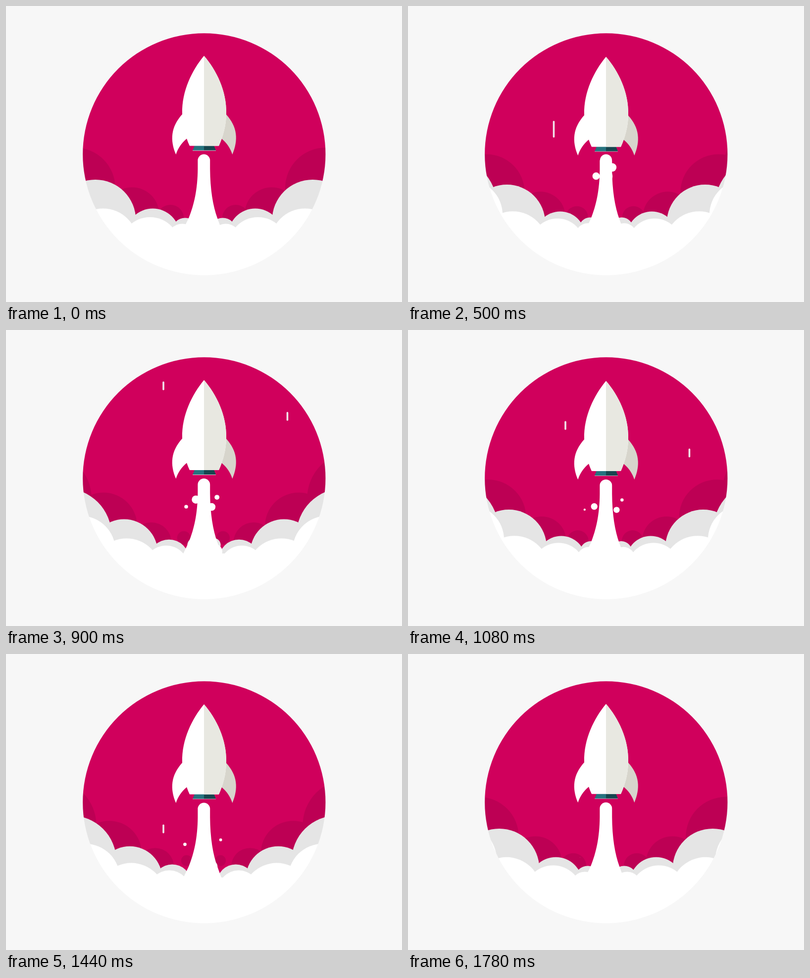
Write an HTML page with a canvas that moves like this. It is 800x600 px and loops after 1.8 s.

```html
<!DOCTYPE html>
<html lang="en">
<head>
<meta charset="utf-8">
<title>Rocket</title>
<style>
html, body { margin: 0; width: 100%; height: 100%; overflow: hidden; background: #f7f7f7; }
canvas { display: block; width: 800px; height: 600px; }
</style>
</head>
<body>
<canvas id="stage" width="800" height="600"></canvas>
<script>
const ctx = document.getElementById('stage').getContext('2d');
const LOOP = 1800, CYCLE = 600, STEP = 20, MID = 400;
const PAPER = '#f7f7f7', PINK = '#d0005c', WHITE = '#fff';

// A cloud is born at the plume and drifts outwards, one stop per cycle.
// away: distance from the middle, top: its highest point, size: radius at stop k
const swell = k => 27.3 * k;
const layers = [
  { color: '#bd0054', away: [13, 66, 141, 253.5, 373], top: [408, 403, 367.5, 287, 215], size: swell, skew: 0.03 },
  { color: '#e5e5e5', away: [2, 38, 103.5, 219.5, 345], top: [412, 429.5, 410.5, 352, 297], size: swell, skew: 0 },
  { color: WHITE, away: [0, 44, 109, 204, 294], top: [425, 441.5, 428, 410.5, 345], size: k => Math.min(30 * k, 70), skew: 0 }
];

const drops = [
  { start: 0, y: 328, vx: -4, vy: 3.35 },
  { start: 130, y: 316, vx: 3.4, vy: 3 },
  { start: 450, y: 343.5, vx: 3.4, vy: 3.35 },
  { start: 500, y: 312.5, vx: -4.1, vy: 7.8 }
];

const streaks = [
  { x: 294.5, len: 34, start: -82, speed: 0.4 },
  { x: 318, len: 18, start: 667, speed: 0.447 },
  { x: 568.5, len: 18, start: 498, speed: 0.413 }
];

const lerp = (a, b, s) => a + (b - a) * s;

// Smooth curve through the stops
function spline(p, i, s) {
  const at = n => p[Math.max(0, Math.min(p.length - 1, n))];
  const a = at(i - 1), b = at(i), c = at(i + 1), d = at(i + 2);
  return b + s / 2 * (c - a + s * (2 * a - 5 * b + 4 * c - d + s * (3 * (b - c) + d - a)));
}

function disc(x, y, r) {
  ctx.beginPath();
  ctx.arc(x, y, Math.max(r, 0), 0, Math.PI * 2);
  ctx.fill();
}

function shape(path, color) {
  ctx.fillStyle = color;
  ctx.fill(new Path2D(path));
}

function drawClouds({ color, away, top, size, skew }, s) {
  ctx.fillStyle = color;
  for (let i = 0; i < away.length - 1; i++) {
    const d = lerp(away[i], away[i + 1], s);
    const r = size(i + s);
    const y = spline(top, i, s) + r;
    for (const side of [-1, 1]) disc(MID + side * d * (1 - side * skew), y, r);
  }
}

function drawStreaks(t) {
  ctx.fillStyle = '#f0e4ea';
  for (const { x, len, start, speed } of streaks) {
    const y = (t - start) * speed;
    if (y < 0 || y > 460) continue;
    ctx.beginPath();
    ctx.roundRect(x - 1.8, y, 3.6, len, 1.8);
    ctx.fill();
  }
}

function drawDrops(t) {
  ctx.fillStyle = WHITE;
  for (const { start, y, vx, vy } of drops) {
    const n = (t - start) / 100;
    if (n >= 0) disc(MID + vx * n, y + vy * n, 12 - 0.92 * n);
  }
}

function drawPlume() {
  shape('M387.4 313 A12.4 12.4 0 0 1 412.2 313 V330' +
    ' C412.5 372 418 405 427 430 L436 455 H357 L369 430' +
    ' C380 403 387 372 387.4 330 Z', WHITE);
}

function drawRocket() {
  shape('M381 283 H420 L424 293 H377 Z', '#26737f');
  shape('M400 283 H420 L424 293 H400 Z', '#17464f');
  shape('M377 292.6 H424 V293.4 H377 Z', '#d5ccd0');
  shape('M356 219.5 C333 245 331 272 343.3 301 C347 289 355 277 365 269 L375 240 Z', WHITE);
  shape('M444.5 219.5 C468 245 469.5 272 457.3 301 C453.5 289 446 277 435.5 269 L425 240 Z', '#d7d5cc');
  const right = 'M400 101 C425 130 446 172 445 218 C445 242 438 266 430 283.6 H';
  shape(right + '371 C363 266 356 242 356 218 C355 172 376 130 400 101 Z', WHITE);
  shape(right + '400 Z', '#e8e8e1');
}

// Two hops per cycle, the second one higher
function shake(s) {
  return 0.5 * Math.sin(Math.PI * s) + (0.6 + 2 * s) * Math.sin(2 * Math.PI * s) ** 2;
}

function frame() {
  const t = Math.floor(performance.now() % LOOP / STEP) * STEP;
  const s = t % CYCLE / CYCLE;

  ctx.fillStyle = PINK;
  ctx.fillRect(0, 0, 800, 600);
  drawStreaks(t);
  for (const layer of layers) drawClouds(layer, s);
  ctx.fillRect(0, 453, 800, 147);
  drawDrops(t);

  ctx.save();
  ctx.translate(0, shake(s));
  drawPlume();
  drawRocket();
  ctx.restore();

  // Cover everything outside the round window
  ctx.fillStyle = PAPER;
  ctx.beginPath();
  ctx.rect(0, 0, 800, 600);
  ctx.arc(400.3, 300.5, 245.2, 0, Math.PI * 2);
  ctx.fill('evenodd');

  requestAnimationFrame(frame);
}
frame();
</script>
</body>
</html>
```
